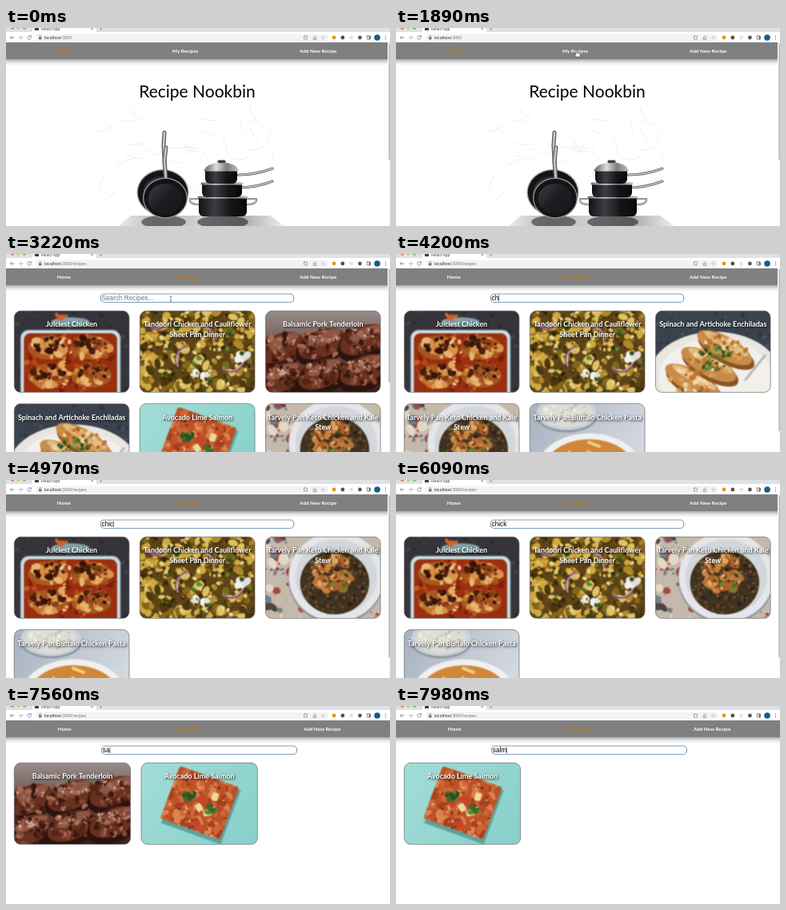
These frames come from a looping animation (480 px wide and 248 px high, 8000 ms). An HTML page with a canvas:

```html
<!DOCTYPE html>
<html lang="en">
<head>
<meta charset="utf-8">
<title>Recipes</title>
<style>
html, body { margin: 0; width: 100%; height: 100%; overflow: hidden; background: #fff; }
canvas { display: block; width: 480px; height: 248px; }
</style>
</head>
<body>
<canvas id="stage"></canvas>
<script>
const LOOP = 8000, W = 480, H = 248;
const SANS = 'Lato, sans-serif', UI = '"Liberation Sans", Arial, sans-serif';
const CARD_W = 143, CARD_H = 102, MID = CARD_W / 2;
const TO_RECIPES = 2030, FOCUS = 2660;
const INK = '#6a6e73';

const stage = document.getElementById('stage');
const dpr = window.devicePixelRatio || 1;
stage.width = W * dpr;
stage.height = H * dpr;
let c = stage.getContext('2d');

// ---- drawing helpers ----
function random(seed) {
  return () => {
    seed = (seed * 16807) % 2147483647;
    return seed / 2147483647;
  };
}
function rect(x, y, w, h, color) {
  c.fillStyle = color;
  c.fillRect(x, y, w, h);
}
function oval(x, y, rx, ry, color, turn = 0) {
  c.fillStyle = color;
  c.beginPath();
  c.ellipse(x, y, rx, ry, turn, 0, 7);
  c.fill();
}
function round(x, y, w, h, r, fill, stroke, width = 1) {
  c.beginPath();
  c.roundRect(x, y, w, h, r);
  if (fill) { c.fillStyle = fill; c.fill(); }
  if (stroke) { c.strokeStyle = stroke; c.lineWidth = width; c.stroke(); }
}
function line(path, color, width = 1) {
  c.strokeStyle = color;
  c.lineWidth = width;
  c.lineCap = c.lineJoin = 'round';
  c.stroke(new Path2D(path));
}
function fade(x0, y0, x1, y1, ...colors) {
  const g = c.createLinearGradient(x0, y0, x1, y1);
  colors.forEach((color, i) => g.addColorStop(i / (colors.length - 1), color));
  return g;
}
function text(str, x, y, font, color, align = 'left') {
  c.font = font;
  c.fillStyle = color;
  c.textAlign = align;
  c.fillText(str, x, y);
}
function turned(x, y, angle, paint) {
  c.save();
  c.translate(x, y);
  c.rotate(angle);
  paint();
  c.restore();
}
// Random flecks inside an ellipse.
function flecks(n, x, y, rx, ry, size, ...colors) {
  const r = random(n * 977 + Math.round(x * 31 + y * 7) + 11);
  for (let i = 0; i < n; i++) {
    const a = r() * 6.283, d = Math.sqrt(r()), s = size * (0.5 + r());
    oval(x + Math.cos(a) * d * rx, y + Math.sin(a) * d * ry,
      s, s * (0.5 + r() * 0.4), colors[Math.floor(r() * colors.length)], r() * 3);
  }
}
function herbs(n, x, y, spread, size = 2.5) {
  flecks(n, x, y, spread, spread * 0.7, size, '#3f6a25', '#5c8a35', '#2d4d1c');
}
function backdrop(fill, ...tones) {
  rect(0, 0, CARD_W, CARD_H, fill);
  flecks(120, MID, 51, 95, 68, 2, ...tones);
}
function plate(x, y, rx, ry, rim, inside) {
  oval(x, y + 2, rx + 1, ry + 1, '#9297a0');
  oval(x, y, rx, ry, rim);
  oval(x, y, rx * 0.86, ry * 0.84, inside);
}

// ---- dishes, each on a 143 x 102 card ----
function bakedChicken() {
  backdrop('#35343a', '#2a292e', '#45434a');
  oval(70, 14, 24, 6, '#7fa3a8');
  flecks(9, 57, 6, 8, 3, 3, '#a8351c', '#d0622a');
  round(8, 24, 124, 95, 10, '#c8dde3', '#8c9298');
  round(12, 28, 116, 90, 8, '#9a2f10');
  flecks(90, 70, 66, 56, 38, 3, '#b5481a', '#c65a20', '#7a200c');
  for (let i = 0; i < 4; i++) {
    const x = 42 + (i % 2) * 54, y = 46 + (i >> 1) * 35;
    oval(x, y, 25, 15, '#a8581f');
    flecks(34 + i, x, y, 22, 13, 4.5, '#d9944c', '#e6b572', '#a4541f', '#c4742f');
    flecks(18 + i, x, y - 4, 20, 9, 3.4, '#4b1e0e', '#351409', '#8a3c16');
  }
  flecks(12, 64, 64, 8, 32, 3.2, '#ecc590', '#e3a95c');
}
function cauliflower() {
  backdrop('#5d4418', '#3b2a0d');
  flecks(300, MID, 51, 95, 68, 5, '#b08829', '#d0a93f', '#84651a', '#dfc262', '#4a370f');
  flecks(200, MID, 52, 95, 68, 2.2, '#ead68a', '#32240c', '#6e4e12', '#d8ae48');
  for (let i = 0; i < 4; i++) {
    turned(20 + i * 32, 16 + (i * 41) % 70, i * 2, () => {
      line('M-13 0 Q0 13 13 0', '#81406d', 2.8);
      line('M-13 -1 Q0 12 13 -1', '#dcc3d2', 1.2);
    });
  }
  flecks(9, 126, 57, 8, 5, 4, '#f3f3ee', '#dfe0e2');
  flecks(8, 75, 79, 14, 6, 3.5, '#f3f3ee', '#e6e2d6');
  herbs(24, MID, 55, 72);
}
function porkLoin() {
  rect(0, 0, CARD_W, CARD_H, fade(0, 0, 0, CARD_H, '#968d8b', '#6b4b43', '#3c1f19'));
  for (let i = 0; i < 6; i++) {
    const x = 18 + (i % 3) * 52, y = 46 + (i > 2) * 38 - (i % 3) * 5;
    oval(x, y + 5, 34, 21, '#2b1310', -0.4);
    oval(x, y, 31, 17, '#67321f', -0.4);
    oval(x + 3, y - 8, 22, 7, '#8e5743', -0.4);
    flecks(45 + i, x, y, 29, 18, 3.2, '#874634', '#3a1711', '#a66a56', '#552317');
    flecks(12 + i, x, y - 8, 20, 6, 1.4, '#d4b1a2', '#bd8c79');
  }
}
function enchiladas() {
  backdrop('#3a424d', '#2d343e', '#47505c');
  plate(74, 82, 82, 56, '#e9e5df', '#f3f0eb');
  for (let i = 0; i < 3; i++) {
    const x = 46 + i * 20, y = 88 - i * 21;
    oval(x + 2, y + 5, 39, 15, '#8a5424', 0.5);
    oval(x, y, 38, 14, '#c88c48', 0.5);
    oval(x + 2, y - 5, 31, 6, '#e5bd83', 0.5);
    flecks(40 + i, x, y, 28, 17, 3, '#a86428', '#efd8a8', '#d9a05a', '#bd7434');
  }
  herbs(38, 72, 58, 24);
  line('M112 86 L136 56', '#b4b7bb', 3);
}
function salmon() {
  rect(0, 0, CARD_W, CARD_H, fade(0, 0, CARD_W, CARD_H, '#a2ddd7', '#86cfc9'));
  turned(72, 50, 0.35, () => {
    rect(-36, -32, 78, 72, '#5ba49e');
    round(-39, -35, 78, 70, 3, '#bd5127');
    c.clip();
    flecks(190, 0, 0, 54, 50, 4.5, '#cf6735', '#a9401d', '#dd8350', '#c25529');
    flecks(90, 0, 0, 54, 50, 1.5, '#7a2b15', '#efb688', '#983719');
  });
  for (let i = 0; i < 7; i++) {
    const x = 74 + Math.cos(i * 2.4) * 4 * i, y = 53 + Math.sin(i * 2.4) * 4 * i;
    turned(x, y, i, () => round(-5, -4, 10, 8, 2, i % 2 ? '#eadd98' : '#c44528'));
  }
  herbs(14, 57, 41, 9, 3.2);
  herbs(10, 86, 58, 8, 3);
}
function ketoStew() {
  backdrop('#c4b9aa', '#a53a2c', '#677c8a', '#e6decf');
  flecks(40, 20, 51, 40, 60, 6, '#a04a3c', '#71828c', '#e2d8c8', '#514541');
  plate(88, 50, 59, 56, '#e4e6ea', '#d3d7dc');
  oval(86, 57, 43, 40, '#42301f');
  flecks(200, 86, 57, 41, 38, 2.2, '#5f452c', '#2b2017', '#795c3c', '#3b3c22');
  flecks(36, 84, 46, 26, 24, 6, '#a8622b', '#c68443', '#8d4a20', '#b97336');
  flecks(30, 84, 44, 24, 22, 2.5, '#dda768', '#6e3718');
  herbs(9, 84, 54, 30);
}
function buffaloPasta() {
  rect(0, 0, CARD_W, CARD_H, fade(0, 0, CARD_W, 80, '#a7b2c0', '#d8dde3'));
  plate(46, 12, 38, 21, '#c9d2da', '#dcdcd5');
  flecks(60, 46, 10, 28, 13, 2.4, '#f1efe6', '#c2c2ba', '#e3e1d6');
  plate(74, 84, 66, 47, '#f0f0f0', '#cf8838');
  const r = random(34);
  for (let i = 0; i < 70; i++) {
    const a = r() * 6.283, d = Math.sqrt(r());
    turned(74 + Math.cos(a) * d * 46, 82 + Math.sin(a) * d * 32, r() * 3, () => {
      round(-9, -3, 18, 6, 3, '#c27a2c');
      round(-9, -3, 18, 4.5, 2.5, r() < 0.5 ? '#f0ca80' : '#e5ad57');
    });
  }
  herbs(12, 76, 80, 36, 1.8);
}

// Paints a dish once and softens it like a photograph.
function prerender(paint) {
  const sheet = document.createElement('canvas'), main = c;
  sheet.width = CARD_W * 2;
  sheet.height = CARD_H * 2;
  c = sheet.getContext('2d');
  c.scale(2, 2);
  paint();
  c.filter = 'blur(1.6px)';
  c.drawImage(sheet, 0, 0, CARD_W, CARD_H);
  c = main;
  return sheet;
}
const recipes = [
  ['Juiciest Chicken', bakedChicken],
  ['Tandoori Chicken and Cauliflower\nSheet Pan Dinner', cauliflower],
  ['Balsamic Pork Tenderloin', porkLoin],
  ['Spinach and Artichoke Enchiladas', enchiladas],
  ['Avocado Lime Salmon', salmon],
  ['Tarvely Pan Keto Chicken and Kale\nStew', ketoStew],
  ['Tarvely Pan Buffalo Chicken Pasta', buffaloPasta],
].map(([title, paint]) => ({ title, art: prerender(paint) }));

// ---- typing ----
const keys = [{ at: 0, value: '' }];
function press(word, start, step, erase) {
  for (let i = 1; i <= word.length; i++) {
    const length = erase ? word.length - i : i;
    keys.push({ at: start + (i - 1) * step, value: word.slice(0, length) });
  }
}
press('chick', 3745, 375);
press('chick', 6370, 120, true);
press('salm', 7280, 190);

// ---- browser ----
function browser(path) {
  rect(0, 0, W, 18, '#fff');
  rect(0, 0, W, 5, '#dee1e6');
  ['#ee6a5f', '#f5bd4f', '#61c454'].forEach((color, i) => oval(8 + i * 7.5, -0.5, 2.2, 2.2, color));
  round(33, -5, 80, 12, 3, '#fff');
  rect(36, 0, 5, 3, '#3b3f46');
  text('React App', 44, 2.6, '5px ' + UI, '#444');
  text('×', 106, 3, '6px ' + UI, '#555');
  text('+', 117, 2.5, '6px ' + UI, '#555');

  line('M10 12 h-4.5 m2 -2 l-2 2 l2 2', INK, 0.7);
  line('M16 12 h4.5 m-2 -2 l2 2 l-2 2', '#9a9da1', 0.7);
  line('M31 10.6 a2.3 2.3 0 1 0 .4 2 M31.3 9.4 v1.6 h-1.6', INK, 0.7);
  round(37, 7.5, 366, 9, 4.5, '#f1f3f4');
  rect(41, 11.5, 3.4, 2.8, INK);
  line('M41.7 11.4 v-1 a1 1 0 0 1 2 0 v1', INK, 0.6);
  text('localhost', 48, 14, '5.3px ' + UI, '#303338');
  text(path, 48 + c.measureText('localhost').width, 14, '5.3px ' + UI, '#73777b');

  round(372.5, 10, 4, 4, 0.5, null, INK, 0.6);
  line('M384.3 11.5 v3 h3.4 v-3 M386 13 v-3.4', INK, 0.6);
  text('☆', 396.5, 14.2, '6.5px "DejaVu Sans", sans-serif', INK, 'center');
  ['#e8931c', '#5a5038', '#e2e4e7', '#54585d', null, '#175c87'].forEach((color, i) => {
    if (color) oval(410 + i * 10.8, 12, i < 5 ? 2.4 : 3.8, i < 5 ? 2.4 : 3.8, color);
  });
  round(451.2, 9.9, 4.2, 4.2, 0.4, null, INK, 0.8);
  rect(453.6, 9.9, 2, 4.2, INK);
  for (let i = -1; i < 2; i++) oval(474.5, 12 + i * 2.1, 0.6, 0.6, INK);
}
function nav(width, active) {
  rect(0, 39, width, 8, fade(0, 39, 0, 47, 'rgba(0,0,0,.34)', 'rgba(0,0,0,.1)', 'rgba(0,0,0,0)'));
  rect(0, 18, width, 21, '#808080');
  [['Home', 0.1515], ['My Recipes', 0.47], ['Add New Recipe', 0.818]].forEach(([label, at], i) =>
    text(label, width * at, 31.3, 'bold 6.3px ' + SANS, i === active ? '#bd720c' : '#fff', 'center'));
}
function scrollbar(bottom) {
  rect(478, 18, 2, 230, '#fafafa');
  round(478.3, 19, 1.7, bottom - 19, 1, '#bdbdbd');
}

// ---- home page ----
function steel(x, w) {
  return fade(x, 0, x + w, 0, '#6c6e71', '#dcdedf', '#7b7d80', '#b6b8ba');
}
function bar(path, width) {
  line(path, '#5a5c5f', width);
  line(path, '#c6c8c9', width * 0.5);
}
function skillet(x, y, rx, ry) {
  oval(x, y, rx, ry, '#97999b');
  oval(x, y, rx - 1.3, ry - 1.3, '#131416');
  oval(x, y + 1, rx * 0.76, ry * 0.74, fade(x - rx, y - ry, x + rx, y + ry, '#4a4c50', '#1c1d20', '#141517'));
}
function marble() {
  const r = random(91);
  for (let i = 0; i < 44; i++) {
    let path = `M${122 + r() * 215} ${112 + r() * 110}`;
    const dir = r() * 6.283;
    for (let k = 0; k < 3; k++) path += ` l${Math.cos(dir + r()) * 7} ${Math.sin(dir + r()) * 6}`;
    line(path, r() < 0.5 ? '#ece8df' : '#eeeeed', 0.8);
  }
}
function pans() {
  c.fillStyle = fade(140, 0, 348, 0, '#ececec', '#b5b6b7', '#d2d2d3', '#aaabac', '#efefef');
  c.fill(new Path2D('M156 235 H330 L348 248 H140 Z'));
  oval(197, 243, 28, 8, 'rgba(45,46,48,.6)');
  oval(271, 243, 32, 8, 'rgba(45,46,48,.65)');
  skillet(196, 206, 32.5, 29);
  bar('M198 131 L197 147 L199 182', 5);
  bar('M200 150 L198 166 L200 190', 5);
  skillet(199, 213, 28, 25.5);

  for (let i = 0; i < 2; i++) bar(`M290 ${184 + i * 16} q22 0 43 -8`, 3);
  bar('M241 214 h-11 q-1 7 11 7 M301 214 h12 q1 7 -12 7', 2.2);
  for (let i = 0; i < 3; i++) {
    const w = 60 - i * 10, x = 271 - i - w / 2, y = 212 - i * 17, h = i ? 17 : 24;
    round(x, y, w, h, [1, 1, 6, 6], fade(x, 0, x + w, 0, '#111214', '#3c3e42', '#141517', '#08090a'));
    round(x - 1.5, y - 1.5, w + 3, 3, 1.5, steel(x, w));
  }
  c.fillStyle = steel(250, 39);
  c.beginPath();
  c.ellipse(269.5, 177, 20, 8.5, 0, Math.PI, 0);
  c.fill();
  round(264.5, 165.5, 10, 3.5, 1.5, '#3b3d40');
}
function home() {
  text('Recipe Nookbin', 239, 86.5, '21px ' + SANS, '#000', 'center');
  marble();
  pans();
}

// ---- recipes page ----
function search(value, focused, since, width) {
  const w = width * 0.505, x = width / 2 - w / 2;
  round(x, 50, w, 10.5, 4.5, '#fff', focused ? '#7d9fbd' : '#8a8a8a', 1.2);
  text(value || 'Search Recipes...', x + 1.3, 58, '8.2px ' + UI, value ? '#000' : '#757575');
  if (focused && since % 1000 < 500) {
    rect(x + 1.5 + (value ? c.measureText(value).width : 0), 51.5, 0.6, 7.8, '#222');
  }
}
function card({ title, art }, x, y, w) {
  c.save();
  round(x, y, w, CARD_H, 8);
  c.clip();
  c.drawImage(art, x, y, w, CARD_H);
  c.restore();
  round(x, y, w, CARD_H, 8, null, '#66686b', 0.7);
  c.save();
  c.shadowColor = '#000';
  c.shadowBlur = 3 * dpr;
  c.shadowOffsetX = c.shadowOffsetY = dpr;
  title.split('\n').forEach((row, i) =>
    text(row, x + w / 2, y + 20 + i * 12.6, 'bold 9px ' + SANS, '#fff', 'center'));
  c.restore();
}
function recipeList(t) {
  const { at, value } = keys.findLast(key => key.at <= t);
  const found = recipes.filter(r => r.title.toLowerCase().includes(value));
  const rows = Math.ceil(found.length / 3), scrolls = rows > 1;
  const width = scrolls ? 478 : 483, w = (width - 47) / 3;
  found.forEach((r, i) =>
    card(r, 10.3 + (i % 3) * (w + 13.4), 71.3 + Math.floor(i / 3) * 116.2, w));
  search(value, t >= FOCUS, t - Math.max(at, FOCUS), width);
  nav(scrolls ? 477 : width, 1);
  if (scrolls) scrollbar(rows > 2 ? 161 : 222);
}

// ---- pointer ----
function ease(from, to, k) {
  k = Math.min(1, Math.max(0, k));
  return from + (to - from) * k * k * (3 - 2 * k);
}
function pointer(t) {
  if (t < 1400 || t >= keys[1].at) return;
  const toLink = (t - 1400) / 420, toSearch = (t - 2200) / 400;
  const x = ease(ease(236, 226, toLink), 206, toSearch);
  const y = ease(ease(256, 32, toLink), 56, toSearch);
  turned(x, y, 0, () => {
    if (y > 50 && y < 61) {
      line('M-1.2 -3 h2.4 M0 -3 v6 M-1.2 3 h2.4', '#555', 0.6);
      return;
    }
    const shape = new Path2D(y < 36
      ? 'M-1 -4 q.8 -.8 1.5 0 v3 l3 .7 q1 .4 .8 1.6 l-.7 3 h-4 l-2.6 -3.4 q.4 -1 2 0 z'
      : 'M0 0 v7 l2 -2 h3 z');
    c.fillStyle = y < 36 ? '#fff' : '#000';
    c.fill(shape);
    c.strokeStyle = y < 36 ? '#333' : '#fff';
    c.lineWidth = 0.6;
    c.stroke(shape);
  });
}

function draw(t) {
  c.setTransform(dpr, 0, 0, dpr, 0, 0);
  rect(0, 0, W, H, '#fff');
  if (t < TO_RECIPES) {
    home();
    nav(477, 0);
    scrollbar(165);
    browser(':3000');
  } else {
    recipeList(t);
    browser(':3000/recipes');
  }
  pointer(t);
}

const start = performance.now();
function tick() {
  draw((performance.now() - start) % LOOP);
  requestAnimationFrame(tick);
}
tick();
</script>
</body>
</html>
```
